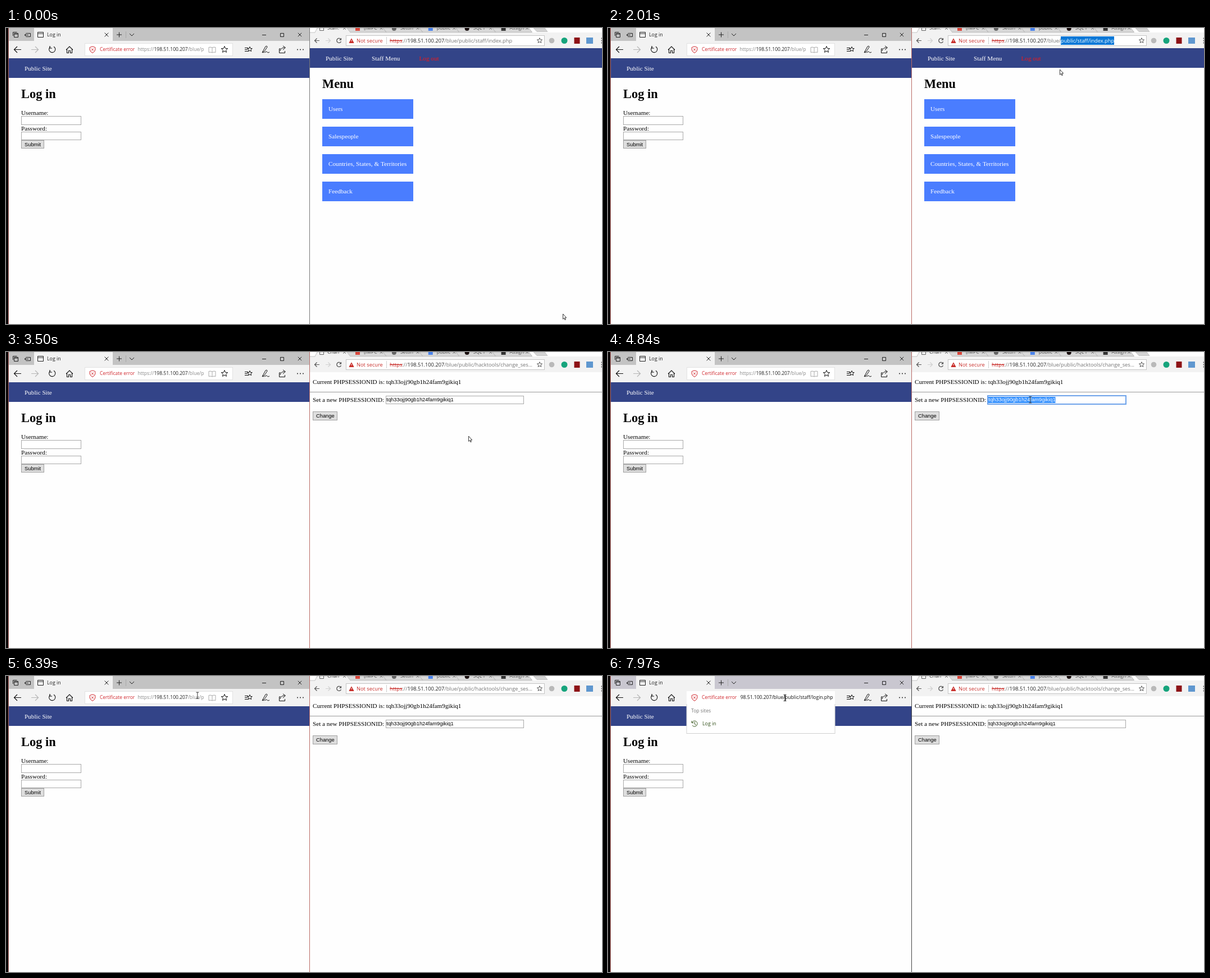
These frames come from a looping animation (1061x528 px, 8 s). An HTML page with a canvas:

```html
<!DOCTYPE html>
<html lang="en">
<head>
<meta charset="utf-8">
<title>Two browser windows</title>
<style>
html, body { margin: 0; width: 100%; height: 100%; overflow: hidden; background: #fff; }
canvas { display: block; }
</style>
</head>
<body>
<canvas id="stage" width="1061" height="528"></canvas>
<script>
const g = document.getElementById('stage').getContext('2d');
const LOOP = 8000;
const UI = '"Open Sans", sans-serif', SERIF = '"Liberation Serif", serif', ARIAL = '"Liberation Sans", sans-serif';
const NAVY = '#334488', RED = '#c9302c', GREY = '#757575', EDGE = '#b86a66';
const HOST = '198.51.100.207', TOKEN = 'tqh33ojj90gb1h24fam9gikiq1';
const TOOL_PATH = '/blue/public/hacktools/change_session_id.php';

// Mouse path: time, x, y
const MOUSE = [
  [0, 991, 510], [70, 991, 510], [300, 950, 250], [540, 901, 23], [850, 863, 23], [1710, 808, 23],
  [1860, 809, 31], [1930, 809, 31], [2010, 804, 74], [2190, 801, 81], [2970, 801, 81], [3500, 823, 150],
  [3760, 846, 180], [3900, 846, 180], [4220, 752, 85], [4840, 752, 85], [5080, 700, 155],
  [5300, 520, 70], [5520, 270, 4], [5610, 211, 12], [5770, 201, 20], [6000, 204, 20],
  [6400, 344, 35], [6860, 344, 35], [7330, 321, 39], [7570, 321, 39], [7970, 315, 39], [8000, 315, 39]
];

function mouseAt(t) {
  const i = Math.max(1, MOUSE.findIndex(k => k[0] > t));
  const a = MOUSE[i - 1], b = MOUSE[i], p = (t - a[0]) / (b[0] - a[0]);
  return [a[1] + (b[1] - a[1]) * p, a[2] + (b[2] - a[2]) * p];
}

function rect(x, y, w, h, color) {
  g.fillStyle = color;
  g.fillRect(x, y, w, h);
}

function frame(x, y, w, h, fill, border) {
  rect(x, y, w, h, border);
  rect(x + 1, y + 1, w - 2, h - 2, fill);
}

// y is the middle of the capitals; returns the right end
function text(str, x, y, size, family, color, weight = '') {
  g.font = `${weight} ${size}px ${family}`;
  g.fillStyle = color;
  g.fillText(str, x, Math.round(y + size * 0.34));
  return x + g.measureText(str).width;
}

const serif = (str, x, y, color = '#000') => text(str, x, y, 11.2, SERIF, color);
const heading = (str, x, y) => text(str, x, y, 22.4, SERIF, '#000', 'bold');

function line(d, color = '#222', width = 1, fill) {
  const p = new Path2D(d);
  if (fill) { g.fillStyle = fill; g.fill(p); }
  g.strokeStyle = color;
  g.lineWidth = width;
  g.stroke(p);
}

function dot(x, y, r, color) {
  g.fillStyle = color;
  g.beginPath();
  g.arc(x, y, r, 0, 7);
  g.fill();
}

const cross = (x, y, r, color, w) => line(`M${x - r} ${y - r}L${x + r} ${y + r}M${x - r} ${y + r}L${x + r} ${y - r}`, color, w);

function star(x, y, r, color) {
  let d = '';
  for (let i = 0; i < 10; i++) {
    const a = i * Math.PI / 5, q = i % 2 ? r * 0.45 : r;
    d += `${i ? 'L' : 'M'}${x + q * Math.sin(a)} ${y - q * Math.cos(a)}`;
  }
  line(d + 'Z', color);
}

function button(label, x, y, w, h) {
  frame(x, y, w, h, '#dedede', '#a0a0a0');
  text(label, x + 6, y + h / 2, 9.33, ARIAL, '#000');
}

function leftWindow(t) {
  const focused = t >= 6460;
  rect(0, 0, 4, 528, '#0c0708');
  rect(4, 0, 1, 528, EDGE);
  rect(5, 0, 535, 23, focused ? '#c9c7d0' : '#c3c3c3');
  rect(5, 23, 535, 31, '#f2f2f2');
  rect(50, 0, 140, 24, '#f2f2f2');
  if (t >= 5610 && t < 6080) rect(190, 0, 23, 23, '#a9a9a9');

  // Title bar
  line('M12.5 14V7.5H19.5M14.5 9.5H21.5V16.5H14.5ZM14.5 11H21.5');
  line('M35.5 9.5H43.5V15.5H35.5M33 12.5H40M35.5 10.5L33 12.5L35.5 14.5');
  line('M56.5 7.5H66.5V16.5H56.5ZM56.5 10H66.5');
  text('Log in', 73, 12, 8.8, UI, '#222');
  cross(179, 12, 3.4);
  line('M197 12H206M201.5 7.5V16.5M220 10L224 14L228 10');
  line('M213.5 6V18', '#aaa');
  line('M456 12.5H463M488.5 9.5H494.5V15.5H488.5Z');
  cross(523, 12, 3.2);

  // Toolbar
  line('M14.5 38.5H27M20 33L14.5 38.5L20 44', '#111', 1.2);
  line('M45 38.5H57M52 33L57.5 38.5L52 44', '#b5b5b5', 1.2);
  line('M79 33.5A5.6 5.6 0 1 0 85 33.2M78 32V36H82', '#111', 1.1);
  line('M107 39L113 33L119 39M108.5 38V44.5H111.5V40.5H114.5V44.5H117.5V38', '#111', 1.1);
  line('M425 35.5H431M425 38.5H430M425 41.5H431', '#111');
  star(434, 38, 4.5, '#111');
  line('M456 44L462 33Q465 31 465 34L459 43Q456 46 458 41M460 44Q464 41 465 43T469 43', '#111');
  line('M489 37H486.5V44.5H496.5V41M488 41Q489 35 496 35M493 32L497.5 35L493 39', '#111');
  for (let x = 519; x < 531; x += 5) dot(x, 38.5, 0.9, '#111');

  // Page
  rect(5, 54, 535, 35, NAVY);
  serif('Public Site', 33, 72, '#fff');
  heading('Log in', 27, 117);
  serif('Username:', 27, 151);
  frame(27, 157, 107, 16, '#fff', '#a9a9a9');
  serif('Password:', 27, 179);
  frame(27, 185, 107, 15, '#fff', '#a9a9a9');
  button('Submit', 27, 200, 41, 15);

  // Address box
  frame(140, 27, 264, 23, '#fff', focused ? '#fff' : '#e2e2e2');
  line('M154 33L158.8 34.5V39Q158 42.5 154 44.5Q150 42.5 149.2 39V34.5Z', '#d0282e');
  cross(154, 38.5, 2, '#d0282e');
  text('Certificate error', 167, 38.5, 8.45, UI, '#d0282e');
  if (focused) {
    text(HOST.slice(1) + '/blue/public/staff/login.php', 235.7, 38.5, 8.55, UI, '#111');
    rect(t < 7850 ? 325 : 315, 33, 1, 12, '#000');
    suggestions(Math.min(1, (t - 6540) / 520));
  } else {
    const x = text('https://', 234.5, 38.5, 8.5, UI, '#888');
    text('/blue/p', text(HOST, x, 38.5, 8.5, UI, '#222'), 38.5, 8.5, UI, '#888');
    line('M367 35Q364 33.5 361 34.5V43.5Q364 42.5 367 44Q370 42.5 373 43.5V34.5Q370 33.5 367 35V44', '#aaa');
    star(389, 38.5, 6, '#111');
  }
}

function suggestions(open) {
  if (open <= 0) return;
  const h = 52 * open;
  g.save();
  g.beginPath();
  g.rect(139, 50, 266, h + 1);
  g.clip();
  frame(139.5, 48, 265, h + 3, '#fff', '#d0d0d0');
  text('Top sites', 148, 62, 8.6, UI, '#777');
  line('M149.5 83A5 5 0 1 1 150 88M149 80V83.5H152.5M154.5 82V86L157 87.5', '#3c5a22');
  text('Log in', 168, 85.5, 8.8, UI, '#2f4d16');
  g.restore();
}

function tabStrip(title, loading) {
  rect(541, 0, 520, 9, '#fff');
  const tabs = ['[IMPC', 'Settin', 'public', 'SQL I', 'Assign'];
  const icons = ['#d9473b', '#666', '#4a83ec', '#1a1010', '#333'];
  for (let i = 4; i >= 0; i--) {
    const x = 613 + 64.9 * i;
    line(`M${x - 8} 0H${x + 58}L${x + 64} 7.5H${x - 2}Z`, '#aaa', 0.8, '#d9d9d9');
    if (i % 2) dot(x + 13, 1, 4, icons[i]);
    else rect(x + 9, 0, 8, 5, icons[i]);
    text(tabs[i], x + 24, 0, 8.6, UI, '#555');
    cross(x + 55, 0.5, 2.3, '#666');
  }
  line('M939 0H959L964 6.5H945Z', '#bbb', 0.8, '#d3d3d3');
  rect(541, 8, 520, 28, '#f2f2f2');
  line('M541 8H550L554 0H607L613 8', '#b5b5b5', 0.8, '#f2f2f2');
  if (!loading) line('M558.5 0V4.5H565.5V0', '#666');
  text(title, 572, 0, 8.8, UI, '#444');
  cross(602.5, 0.5, 2.3, '#555');
}

function rightToolbar(t) {
  const editing = t >= 2100 && t < 2570, loading = t >= 2570 && t < 3130, tool = t >= 3130;
  tabStrip(tool ? 'Chan' : t >= 2660 ? 'https:' : 'Staff:', t >= 2660 && loading);
  line('M549.5 22.5H558M553.5 18.5L549.5 22.5L553.5 26.5', '#555', 1.2);
  line('M569 22.5H577M573.5 18.5L577.5 22.5L573.5 26.5', '#d0d0d0', 1.2);
  if (loading) cross(592.5, 22.5, 3.6, '#555', 1.3);
  else {
    line('M596 20A4 4 0 1 0 596.5 24', '#555', 1.3);
    line('M596.8 18V21.5H593.5Z', '#555', 0.5, '#555');
  }
  frame(605, 13, 354, 19, '#fff', '#c4c4c4');

  const url = (str, x, color) => text(str, x, 22.5, 9.27, UI, color);
  if (editing) {
    line('M610.5 18.5H616.5V27H610.5Z', '#666');
    url('https://' + HOST + TOOL_PATH, 624, '#222');
  } else {
    let x = 607;
    if (!loading) {
      line('M615 19L619 26.5H611Z', RED, 1, RED);
      rect(614.6, 21, 0.9, 3, '#fff');
      url('Not secure', 624, RED);
      rect(677, 16, 1, 13, '#ccc');
      x = 683;
    }
    const end = url('https', x, RED);
    rect(x, 22, end - x, 1, RED);
    x = url(HOST, url('://', end, GREY), '#222');
    if (loading) url(TOOL_PATH, x, GREY);
    else if (tool) url('/blue/public/hacktools/change_ses...', x, GREY);
    else {
      x = url('/blue/', x, GREY);
      const tail = 'public/staff/index.php', tailEnd = url(tail, x, GREY);
      if (t >= 540) {
        const from = t >= 1710 ? x : Math.max(x, mouseAt(t)[0]);
        g.save();
        g.beginPath();
        g.rect(from, 15, tailEnd - from, 15);
        g.clip();
        rect(from, 15, tailEnd - from, 15, '#0a78d7');
        url(tail, x, '#fff');
        g.restore();
      }
    }
  }

  star(950, 22.5, 4.8, '#555');
  dot(971.5, 22.5, 4.8, '#b9b9b9');
  dot(994, 22.5, 5.5, '#16a47c');
  rect(1011.5, 17, 10, 11, '#8d1216');
  rect(1033, 17, 12, 11, '#5f97cf');
  for (let y = 18.5; y < 28; y += 4) dot(1060.5, y, 1, '#555');
}

function menuPage() {
  rect(541, 36, 520, 35, NAVY);
  serif('Public Site', 569, 54, '#fff');
  serif('Staff Menu', 651, 54, '#fff');
  serif('Log out', 735.5, 54, '#f01818');
  heading('Menu', 563, 99);
  ['Users', 'Salespeople', 'Countries, States, & Territories', 'Feedback'].forEach((name, i) => {
    rect(563, 127 + 49 * i, 162, 35, '#4a7dff');
    serif(name, 574, 144.5 + 49 * i, '#fff');
  });
}

function toolPage(t) {
  serif('Current PHPSESSIONID is: ' + TOKEN, 546, 53.5);
  rect(541, 71, 520, 1, '#999');
  serif('Set a new PHPSESSIONID:', 546, 85);
  const active = t >= 4370 && t < 5080, selected = t >= 4450 && active;
  if (active) rect(675, 77, 248, 17, '#6ea3ea');
  frame(676, 78, 246, 15, '#fff', active ? '#6ea3ea' : '#a9a9a9');
  if (selected) rect(677, 80, 119.5, 11, '#3390ff');
  text(TOKEN, 677.3, 85, 9.33, ARIAL, selected ? '#fff' : '#000');
  button('Change', 546, 106, 44, 16);
}

function omniboxList() {
  rect(541, 35, 520, 46, '#fff');
  rect(541, 35, 520, 23, '#eee');
  rect(541, 81, 520, 1, '#ccc');
  line('M610.5 42.5H616.5V51H610.5Z', '#777');
  text('https://' + HOST + TOOL_PATH, 624, 46.5, 9.27, UI, '#2a62c9');
  line('M616 68A3 3 0 1 1 616 67.9M615 70L618 73', '#777');
  text('https://' + HOST + TOOL_PATH, 624, 69.5, 9.27, UI, '#222');
}

function pointer(t) {
  const [x, y] = mouseAt(t);
  const beam = t >= 530 && t < 1980 || t >= 4180 && t < 4900 || t >= 6250;
  g.save();
  g.translate(x, y);
  if (beam) line('M-2.5 -5.5H2.5M0 -5.5V5.5M-2.5 5.5H2.5', '#222', 0.9);
  else line('M0.5 0V9.3L2.6 7.4L4 10.7L5.3 10.1L3.9 6.9H6.7Z', '#222', 0.9, '#fff');
  g.restore();
}

function draw(now) {
  const t = now % LOOP;
  rect(0, 0, 1061, 528, '#fefefe');
  leftWindow(t);
  rect(540, 0, 1, 528, t < 540 ? '#777' : t < 6400 ? EDGE : '#444');
  rightToolbar(t);
  if (t < 3130) menuPage();
  else toolPage(t);
  if (t >= 2100 && t < 2570) omniboxList();
  pointer(t);
}

const start = performance.now();
function tick() {
  draw(performance.now() - start);
  requestAnimationFrame(tick);
}
tick();
</script>
</body>
</html>
```
